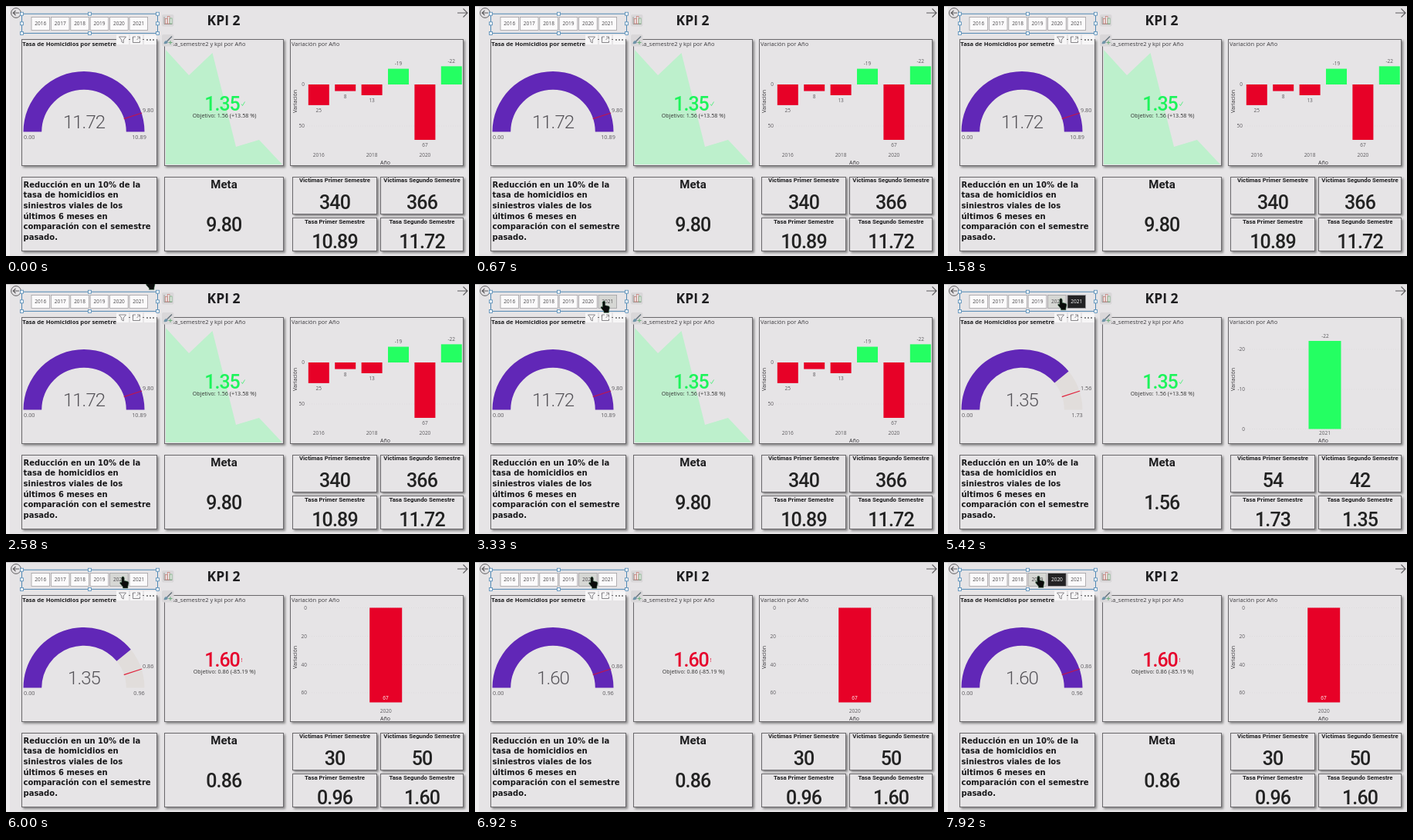
Write an HTML page that moves like this. It is 600 px wide and 325 px high and loops after 8 s.

```html
<!DOCTYPE html>
<html lang="es">
<head>
<meta charset="utf-8">
<title>KPI 2</title>
<style>
html, body { margin: 0; width: 600px; height: 325px; overflow: hidden; background: #e6e4e6; }
svg { display: block; }
text { font-family: "Open Sans", sans-serif; fill: #5c5a5e; font-size: 6.5px; }
.mid { text-anchor: middle; }
.end { text-anchor: end; }
.h1 { font-size: 17.5px; font-weight: 700; fill: #1d1d1f; }
.bold { font-size: 7.7px; font-weight: 700; fill: #1d1d1f; }
.cap { font-size: 7.5px; fill: #3c3a3e; }
.goal { font-size: 7.2px; fill: #333; }
.mark { font-size: 7.3px; }
.axis { font-size: 7px; font-weight: 500; fill: #333135; }
.note { font: 700 10px "DejaVu Sans", sans-serif; fill: #161618; }
.head { font: 700 7.8px Roboto, sans-serif; fill: #1d1d1f; }
.meta { font: 700 15px Roboto, sans-serif; fill: #1d1d1f; }
.num { font: 500 25px Roboto, sans-serif; letter-spacing: -.035em; fill: #222; }
.kpi { font: 500 25px Roboto, sans-serif; letter-spacing: -.04em; }
.dial { font: 300 24px Roboto, sans-serif; letter-spacing: -.04em; fill: #555358; }
.card { fill: #e6e4e6; stroke: #6a686b; stroke-width: 1; }
#cards { filter: drop-shadow(2.3px 2.3px 1.4px rgba(0, 0, 0, .42)); }
</style>
</head>
<body>
<svg id="stage" width="600" height="325" viewBox="0 0 600 325"></svg>
<script>
const LOOP = 8000;
const RED = '#e70127', GREEN = '#24ff62', PURPLE = '#6127b7';
const stage = document.getElementById('stage');

function add(parent, tag, attrs = {}, label) {
  const el = document.createElementNS('http://www.w3.org/2000/svg', tag);
  for (const k in attrs) el.setAttribute(k, attrs[k]);
  if (label !== undefined) el.textContent = label;
  parent.appendChild(el);
  return el;
}
const group = (attrs, parent = stage) => add(parent, 'g', attrs);
const rect = (p, x, y, width, height, attrs) => add(p, 'rect', { x, y, width, height, ...attrs });
const text = (p, x, y, cls, label, attrs) => add(p, 'text', { x, y, class: cls, ...attrs }, label);
const path = (p, d, attrs) => add(p, 'path', { d, fill: 'none', ...attrs });

// Page frame
rect(stage, 0, 0, 5, 325, { fill: '#f1f0f1' });
rect(stage, 0, 0, 600, 1, { fill: '#c4c2c4' });
const cards = group({ id: 'cards' });
for (const [x, y, r, b] of [
  [20, 43, 196, 208], [205, 43, 360, 208], [368, 43, 593, 208],
  [20, 222, 196, 319], [205, 222, 360, 319],
  [371, 222, 481, 271], [485, 222, 593, 271],
  [371, 275, 481, 319], [485, 275, 593, 319]
]) rect(cards, x + .5, y + .5, r - x - 1, b - y - 1, { class: 'card' });

text(stage, 282, 25, 'h1 mid', 'KPI 2');
text(stage, 21.3, 52, 'bold', 'Tasa de Homicidios por semetre');
text(stage, 207, 52, 'cap', 'Tasa_semestre2 y kpi por Año');
text(stage, 370, 52, 'cap', 'Variación por Año');
text(stage, 282.5, 237, 'meta mid', 'Meta');
text(stage, 426, 229, 'head mid', 'Victimas Primer Semestre');
text(stage, 539, 229, 'head mid', 'Victimas Segundo Semestre');
text(stage, 426, 282.7, 'head mid', 'Tasa Primer Semestre');
text(stage, 539, 282.7, 'head mid', 'Tasa Segundo Semestre');
['Reducción en un 10% de la', 'tasa de homicidios en', 'siniestros viales de los',
  'últimos 6 meses en', 'comparación con el semestre', 'pasado.'
].forEach((line, i) => text(stage, 22.5, 235.8 + i * 13.6, 'note', line));

// Navigation arrows
add(stage, 'circle', { cx: 13, cy: 9, r: 6.3, fill: 'none', stroke: '#5b595c' });
path(stage, 'M17 9H9.5M12.5 5.8L9.3 9L12.5 12.2', { stroke: '#5b595c', 'stroke-width': 1.2 });
path(stage, 'M585 9H598M592.5 3.5L598 9L592.5 14.5', { stroke: '#5b595c', 'stroke-width': 1.1 });

// Gauge
const CX = 101, CY = 163.5, R = 78.5, INNER = 54.8;
function ring(from, to) {
  const at = (r, f) => {
    const a = Math.PI * (1 - f);
    return (CX + r * Math.cos(a)).toFixed(2) + ' ' + (CY - r * Math.sin(a)).toFixed(2);
  };
  return `M${at(R, from)}A${R} ${R} 0 0 1 ${at(R, to)}L${at(INNER, to)}A${INNER} ${INNER} 0 0 0 ${at(INNER, from)}Z`;
}
path(stage, ring(0, 1), { fill: '#e1dddb' });
const arc = path(stage, '', { fill: PURPLE });
const needle = path(stage, 'M152.8 146.6L176.2 139', { 'stroke-width': 1.2 });
const dial = text(stage, 101, 158.7, 'dial mid', '');
text(stage, 30.3, 173, 'mark mid', '0.00');

// One view per slicer selection
const views = [
  { goal: '9.80', max: '10.89', v1: '340', v2: '366', t2: '11.72', rate: '1.35', note: '1.56 (+13.58 %)', good: true },
  { goal: '1.56', max: '1.73', v1: '54', v2: '42', t2: '1.35', rate: '1.35', note: '1.56 (+13.58 %)', good: true },
  { goal: '0.86', max: '0.96', v1: '30', v2: '50', t2: '1.60', rate: '1.60', note: '0.86 (-85.19 %)', good: false }
];

function axis(g, right, ticks) {
  for (const [label, y] of ticks) {
    path(g, `M${right + 3} ${y}H591`, { stroke: '#d9d7d9', 'stroke-width': .6, 'stroke-dasharray': '1 2' });
    text(g, right, y + 2.3, 'end', label);
  }
}

function bigBar(g, x, top, bottom, fill, year, ticks) {
  axis(g, 390, ticks);
  rect(g, x, top, 42, bottom - top, { fill });
  text(g, x + 21, 196.3, 'mid', year);
}

const charts = [
  g => {
    axis(g, 387, [['0', 102], ['50', 156]]);
    [25, 8, 13, -19, 67, -22].forEach((v, i) => {
      const x = 405.3 + i * 34.4, h = Math.abs(v) * 1.075;
      rect(g, x - 13.5, v > 0 ? 102 : 102 - h, 27, h, { fill: v > 0 ? RED : GREEN });
      text(g, x, v > 0 ? 111 + h : 97.5 - h, 'mid', v);
      if (i % 2 === 0) text(g, x, 195.5, 'mid', 2016 + i);
    });
  },
  g => {
    bigBar(g, 472.5, 74, 188.5, GREEN, 2021, [['-20', 85], ['-10', 137], ['0', 188.5]]);
    text(g, 494, 70, 'mid', '-22');
  },
  g => {
    bigBar(g, 471.2, 59.5, 182.5, RED, 2020, [['0', 59.5], ['20', 96.5], ['40', 133.5], ['60', 170]]);
    text(g, 492, 179, 'mid', '67', { style: 'fill:#fff' });
  }
];

const layers = views.map((v, i) => {
  const g = group({});
  const color = v.good ? '#1df45b' : '#e6022c';
  if (i === 0) path(g, 'M207 57L237 90L267.5 61L298 183L328 174L358 206H207Z', { fill: '#bdf0cc' });
  text(g, 280, 136.4, 'kpi mid', v.rate, { style: `fill:${color}` });
  if (v.good) path(g, 'M305 127.5L306.5 129.5L309.5 124.5', { stroke: color, 'stroke-width': .7 });
  else text(g, 304.5, 130, 'mark', '!', { style: `fill:${color}` });
  text(g, 283, 145.2, 'goal mid', 'Objetivo: ' + v.note);
  text(g, 177, 138, 'mark', v.goal);
  text(g, 172.5, 173, 'mark mid', v.max);
  text(g, 282.3, 292.9, 'num mid', v.goal);
  text(g, 426, 263.5, 'num mid', v.v1);
  text(g, 539, 263.5, 'num mid', v.v2);
  text(g, 426, 314.8, 'num mid', v.max);
  text(g, 539, 314.8, 'num mid', v.t2);
  charts[i](g);
  return g;
});
text(stage, 491.5, 205.5, 'axis mid', 'Año');
text(stage, 0, 0, 'axis mid', 'Variación', { transform: 'translate(377 124)rotate(-90)' });

// Slicer
rect(stage, 20.5, 10.2, 176, 25.2, { fill: 'none', stroke: '#4f88b4' });
for (const x of [20.5, 108.5, 196.5]) for (const y of [10.2, 22.8, 35.4])
  if (x !== 108.5 || y !== 22.8) rect(stage, x - 2, y - 2, 4, 4, { fill: '#f4f8fb', stroke: '#4f88b4', 'stroke-width': .8 });
const buttons = [...Array(6).keys()].map(i => {
  const x = 33 + i * 25.4;
  return {
    x,
    box: rect(stage, x, 14.5, 23.6, 17, { stroke: '#a3a1a3', 'stroke-width': .8 }),
    label: text(stage, x + 11.8, 25.3, 'mid', 2016 + i)
  };
});

// Visual header icons
for (const x of [143, 161, 179]) rect(stage, x, 37.5, 16, 12.5, { fill: '#f7f6f7' });
const line = { stroke: '#6d6b6f', 'stroke-width': .8 };
path(stage, 'M146.5 40H155.5L152.2 44V48L149.8 46.5V44Z', line);
path(stage, 'M164.5 43V40H168M164.5 40V47.5H173.5V45M170 40H173.5V43.5M169.5 44L173 40.5', line);
for (const cx of [183, 187, 191]) add(stage, 'circle', { cx, cy: 44, r: .9, fill: '#555' });

for (const y of [11, 37]) rect(stage, 202, y, 15.5, 15.5, { rx: 2, fill: '#d9d7d9' });
path(stage, 'M205 14V23.5H215.5', { stroke: '#8b8f8a', 'stroke-width': .8 });
rect(stage, 206.5, 16.5, 2.5, 6.5, { fill: '#eee', stroke: '#c47a72', 'stroke-width': .7 });
rect(stage, 209.5, 13.5, 2.5, 9.5, { fill: '#eee', stroke: '#c47a72', 'stroke-width': .7 });
rect(stage, 212.5, 16, 2.5, 7, { fill: '#eee', stroke: '#6da877', 'stroke-width': .7 });
path(stage, 'M215 39.5L209 45.5', { stroke: '#66737c', 'stroke-width': 1.5 });
path(stage, 'M204.5 49Q205 45 208.5 45L210 47Q208.5 50 204.5 49Z', { fill: '#6f93a8' });
path(stage, 'M213 45V50M210.5 47.5H215.5', { stroke: '#6bab7b', 'stroke-width': 1 });

const hand = path(stage,
  'M-1.6 1.4a1.6 1.6 0 0 1 3.2 0v3.8l4.4 1q1.7.5 1.4 2.2l-1 4v2.4h-6.4v-1.8l-3.8-4.4q-.4-2 1.5-1.5l.7.7z',
  { fill: '#0b0b0b', stroke: '#2f6a42', 'stroke-width': .5 });

// Timeline
const PICK = [0, 3920, 5830];
const moves = [
  [2400, 192, -18], [2850, 167, 22.5], [4750, 167, 22.5],
  [5050, 151.5, 19], [7380, 151.5, 19.5], [7580, 122.5, 18.5], [LOOP, 122.5, 18.5]
];
const sweeps = [
  { at: 3990, span: 800, from: 11.72, to: 1.35, a: 1, b: 1.35 / 1.73 },
  { at: 5900, span: 800, from: 1.35, to: 1.6, a: 1.35 / 1.73, b: 1 }
];
const ease = p => p < .5 ? 4 * p ** 3 : 1 - 4 * (1 - p) ** 3;
const clamp = p => Math.max(0, Math.min(1, p));
const mix = (a, b, p) => a + (b - a) * p;

function pointer(t) {
  if (t < moves[0][0]) return [192, -40];
  const i = moves.findIndex(m => t < m[0]);
  const [t0, x0, y0] = moves[i - 1], [t1, x1, y1] = moves[i];
  const p = ease((t - t0) / (t1 - t0));
  return [mix(x0, x1, p), mix(y0, y1, p)];
}

function draw(t) {
  const view = t < PICK[1] ? 0 : t < PICK[2] ? 1 : 2;
  layers.forEach((g, i) => g.setAttribute('display', i === view ? 'inline' : 'none'));

  const s = t < sweeps[1].at ? sweeps[0] : sweeps[1];
  const p = ease(clamp((t - s.at) / s.span));
  const fill = mix(s.a, s.b, p);
  arc.setAttribute('d', ring(0, fill));
  needle.setAttribute('stroke', fill < .9 ? '#e0213a' : '#bd1750');
  dial.textContent = mix(s.from, s.to, p).toFixed(2);

  const [x, y] = pointer(t);
  hand.setAttribute('transform', `translate(${x} ${y})`);
  const chosen = [-1, 5, 4][view];
  buttons.forEach((b, i) => {
    const hover = y > 14.5 && y < 31.5 && x >= b.x && x < b.x + 24.5;
    const dark = i === chosen && !hover;
    b.box.setAttribute('fill', hover ? '#d6d7d4' : dark ? '#232224' : '#fbfafb');
    b.label.style.fill = dark ? '#fff' : '#4a484b';
  });
}

function tick() {
  draw(performance.now() % LOOP);
  requestAnimationFrame(tick);
}
tick();
</script>
</body>
</html>
```
